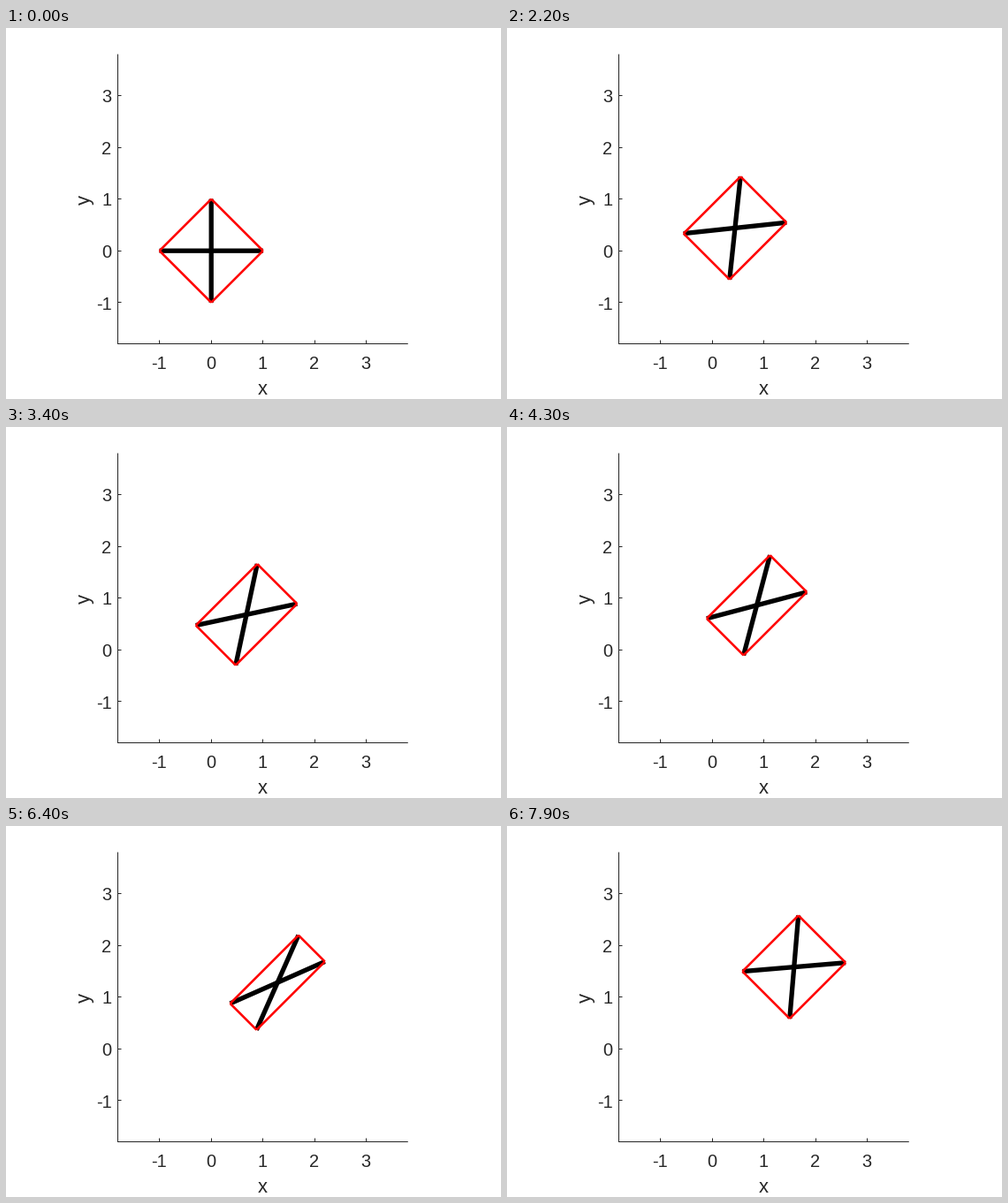
A matplotlib script that plays this animation: 560 by 420 pixels, repeating every 8 s.

```python
import numpy as np
import matplotlib.pyplot as plt
from matplotlib.animation import FuncAnimation

W, H, DPI = 560, 420, 100
FRAMES, STEP_MS = 80, 100
UNIT, X0, Y0 = 58.57, 232.2, 252.2     # pixels per unit, origin on the stage
LOW, HIGH = -1.8, 3.8                  # limits of both axes
TICK = 4
GREY = "#262626"

SPEED = 0.2                            # drift along x and y, units per second
PERIOD = 1.911                         # seconds per swing
SWING, SHARP = np.radians([30.6, 0.5])  # rod turn and its small second harmonic


def pt(px):
    return px * 72 / DPI


def to_x(v):
    return X0 + UNIT * v


def to_y(v):
    return Y0 - UNIT * v


def crisp(p):
    return np.floor(p) + 0.5


fig = plt.figure(figsize=(W / DPI, H / DPI), dpi=DPI, facecolor="white")
ax = fig.add_axes([0, 0, 1, 1])
ax.set_xlim(0, W)
ax.set_ylim(H, 0)
ax.axis("off")


def line(width, color, xs=(), ys=()):
    return ax.plot(xs, ys, color=color, lw=pt(width), solid_capstyle="butt",
                   snap=False)[0]


def label(x, y, s, size=20, **kw):
    ax.text(x, y, s, color=GREY, family="Liberation Sans", fontsize=pt(size),
            va="baseline", parse_math=False, **kw)


left, bottom = crisp(to_x(LOW)), crisp(to_y(LOW))
line(1, GREY, [left, left], [to_y(HIGH), bottom + 0.5])
line(1, GREY, [left - 0.5, to_x(HIGH)], [bottom, bottom])
for v in range(-1, 4):
    x, y = crisp(to_x(v)), crisp(to_y(v))
    line(1, GREY, [x, x], [bottom, bottom - TICK])
    line(1, GREY, [left, left + TICK], [y, y])
    label(to_x(v) - 0.8, 386, str(v), ha="center")
    label(119.5, to_y(v) + 7.8, str(v), ha="right")
label(290.5, 415.4, "x", 22, ha="center")
label(94.5, 194, "y", 22, ha="center", rotation=90, rotation_mode="anchor")

rods = [line(5.3, "black") for _ in range(2)]
sides = [line(2.6, "red") for _ in range(4)]


def draw(i):
    t = i * STEP_MS / 1000
    phase = np.pi * t / PERIOD
    turn = SWING * np.sin(phase) ** 2 - SHARP * np.sin(2 * phase) ** 2
    # right, top, left, bottom ends; the rods close like scissors
    angles = np.array([turn, np.pi / 2 - turn, np.pi + turn, 1.5 * np.pi - turn])
    x = to_x(SPEED * t + np.cos(angles))
    y = to_y(SPEED * t + np.sin(angles))
    for k, rod in enumerate(rods):
        rod.set_data(x[k::2], y[k::2])
    for k, side in enumerate(sides):
        ends = [k, (k + 1) % 4]
        side.set_data(x[ends], y[ends])
    return [*rods, *sides]


anim = FuncAnimation(fig, draw, frames=FRAMES, interval=STEP_MS,
                     repeat=True, repeat_delay=0, blit=False)
plt.show()
```
